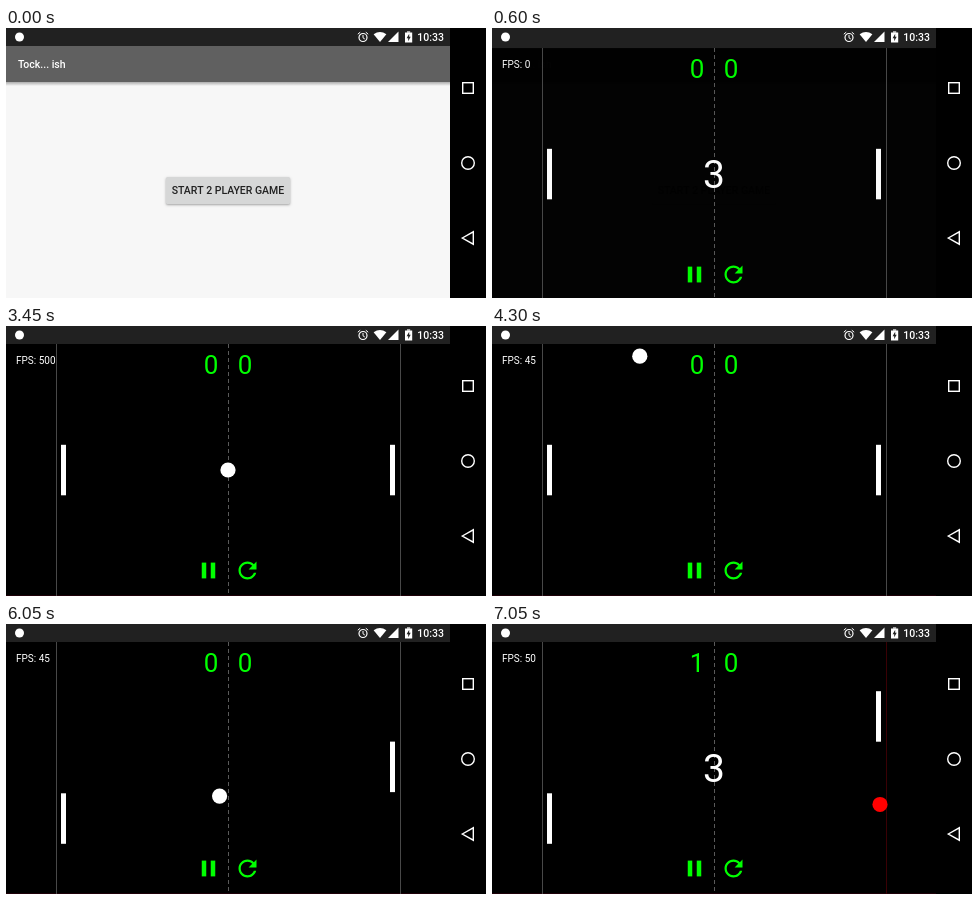
An HTML page with a canvas that plays this animation: 480x270 px, repeating every 8 s.

```html
<!DOCTYPE html>
<html lang="en">
<head>
<meta charset="utf-8">
<title>Paddle game</title>
<style>
  html, body { margin: 0; width: 100%; height: 100%; overflow: hidden; background: #000; }
  canvas { display: block; }
</style>
</head>
<body>
<canvas id="stage" width="480" height="270"></canvas>
<script>
const c = document.getElementById('stage').getContext('2d');
const LOOP = 8000, STEP = 50;
const OPEN = 468, SERVE = 3450, BOUNCE = 4268, HIT = 5220, GOAL = 7050;
const GREEN = '#00ff00';
const FPS = [43, 47, 50, 45, 52, 41, 47];
const REFRESH = new Path2D('M17.65 6.35C16.2 4.9 14.21 4 12 4c-4.42 0-7.99 3.58-7.99 8s3.57 8 7.99 8c3.73 0 6.84-2.55 7.73-6h-2.08c-.82 2.33-3.04 4-5.65 4-3.31 0-6-2.69-6-6s2.69-6 6-6c1.66 0 3.14.69 4.22 1.78L13 11h7V4l-2.35 2.35z');

const clamp = p => Math.max(0, Math.min(1, p));
const smooth = (t, from, to) => {
  const p = clamp((t - from) / (to - from));
  return p * p * (3 - 2 * p);
};
const easeOut = (p, power) => 1 - (1 - clamp(p)) ** power;

function rect(x, y, w, h, color) {
  c.fillStyle = color;
  c.fillRect(x, y, w, h);
}

function disc(x, y, r, color) {
  c.fillStyle = color;
  c.beginPath();
  c.arc(x, y, r, 0, 7);
  c.fill();
}

function ring(x, y, r, width) {
  c.strokeStyle = '#fff';
  c.lineWidth = width;
  c.beginPath();
  c.arc(x, y, r, 0, 7);
  c.stroke();
}

function path(points, close) {
  c.beginPath();
  points.forEach(p => c.lineTo(...p));
  if (close) c.closePath();
}

function poly(points, color) {
  path(points, true);
  c.fillStyle = color;
  c.fill();
}

function text(str, x, y, size, color, weight = 400, align = 'left') {
  c.font = `${weight} ${size}px Roboto, sans-serif`;
  c.textAlign = align;
  c.fillStyle = color;
  c.fillText(str, x, y);
}

function drawMenu() {
  rect(0, 18, 444, 252, '#f7f7f7');
  const shade = c.createLinearGradient(0, 54, 0, 58);
  shade.addColorStop(0, 'rgba(0,0,0,.3)');
  shade.addColorStop(1, 'rgba(0,0,0,0)');
  rect(0, 54, 444, 4, shade);
  rect(0, 18, 444, 36, '#606060');
  text('Tock... ish', 12, 40, 10.5, '#fff', 500);

  c.save();
  c.shadowColor = 'rgba(0,0,0,.35)';
  c.shadowBlur = 2.5;
  c.shadowOffsetY = 1;
  c.fillStyle = '#d6d7d7';
  c.beginPath();
  c.roundRect(160, 149, 124, 27, 1.5);
  c.fill();
  c.restore();
  text('START 2 PLAYER GAME', 222, 166.3, 10.5, '#212121', 500, 'center');
}

function ballAt(t) {
  if (t < HIT) {
    const dy = t < BOUNCE ? SERVE - t : t - 2 * BOUNCE + SERVE;
    return [222 - 0.0873 * (t - SERVE), 144 + 0.1448 * dy];
  }
  const dt = Math.min(t, 7041) - HIT;
  return [67.5 + 0.176 * dt, 165 + 0.0085 * dt];
}

function fpsAt(t) {
  if (t < SERVE) return 0;
  if (t === SERVE) return 500;
  return FPS[(Math.min(t, GOAL) - SERVE) / STEP % FPS.length];
}

function countAt(t) {
  if (t >= GOAL) return 3;
  if (t >= SERVE) return 0;
  return t < 1450 ? 3 : t < 2450 ? 2 : 1;
}

function drawGame(t) {
  const age = t - OPEN, goal = t >= GOAL;
  const alpha = easeOut(age / 200, 4);
  c.save();
  c.beginPath();
  c.rect(0, 18, 444, 252);
  c.clip();
  c.translate(0, 21.6 * (1 - easeOut(age / 350, 5)));
  c.globalAlpha = alpha;

  rect(0, 0, 444, 18, '#212121');
  rect(0, 18, 444, 252, '#000');
  rect(0, 269, 444, 1, '#1e0008');
  rect(50, 18, 1, 252, '#484848');
  rect(394, 18, 1, 252, goal ? '#3a0004' : '#484848');
  for (let y = 18; y < 270; y += 7) rect(222, y, 1, 4, '#5a5a5a');

  rect(55, 118.8 + 50.5 * smooth(t, 5050, 5430), 5, 50.5, '#fff');
  rect(384, 118.8 - 51.6 * smooth(t, 6005, 6505), 5, 50.5, '#fff');
  text('FPS: ' + fpsAt(t), 10, 38, 10, '#fff');

  if (t >= SERVE) disc(...ballAt(t), 7.6, goal ? '#f00' : '#fff');
  const count = countAt(t);
  if (count) text(count, 222, 157.5, 39, '#fff', 400, 'center');

  c.globalAlpha = Math.max(alpha, 0.85);
  text(goal ? 1 : 0, 205, 48.3, 26, GREEN, 400, 'center');
  text(0, 239, 48.3, 26, GREEN, 400, 'center');
  rect(195.75, 236.6, 4.5, 15.8, GREEN);
  rect(204.75, 236.6, 4.5, 15.8, GREEN);
  c.translate(228, 231);
  c.scale(1.125, 1.125);
  c.fill(REFRESH);
  c.restore();
}

function drawStatusBar() {
  rect(0, 0, 444, 18, '#212121');
  disc(13.5, 9, 4.5, '#fff');

  // alarm clock
  ring(357, 9.5, 4, 1.2);
  path([[357, 7], [357, 9.8], [358.8, 11]]);
  c.lineWidth = 1;
  c.stroke();
  path([[351.8, 6.2], [354.2, 4.2]]);
  c.stroke();
  path([[362.2, 6.2], [359.8, 4.2]]);
  c.stroke();

  // wifi and signal
  c.fillStyle = '#fff';
  c.beginPath();
  c.moveTo(374, 14);
  c.lineTo(367.6, 6.2);
  c.quadraticCurveTo(374, 2, 380.4, 6.2);
  c.fill();
  poly([[382, 14], [392.5, 14], [392.5, 3.5]], '#fff');

  // charging battery
  rect(399, 4.5, 7.2, 10, '#fff');
  rect(401, 3.4, 3.2, 1.2, '#fff');
  poly([[403.2, 5.8], [400.6, 10.2], [402.2, 10.2], [402.2, 13.2], [404.7, 8.8], [403.2, 8.8]], '#212121');

  text('10:33', 438, 13, 10.5, '#fff', 500, 'right');
}

function drawNavBar() {
  rect(444, 0, 36, 270, '#000');
  ring(462, 135, 6.3, 1.4);
  c.strokeRect(456.7, 54.7, 10.6, 10.6);
  path([[456.3, 210], [467.3, 203.8], [467.3, 216.2]], true);
  c.stroke();
}

function frame(now) {
  const t = Math.floor(now % LOOP / STEP) * STEP;
  drawMenu();
  if (t >= 500) drawGame(t);
  drawStatusBar();
  drawNavBar();
  requestAnimationFrame(frame);
}
requestAnimationFrame(frame);
</script>
</body>
</html>
```
